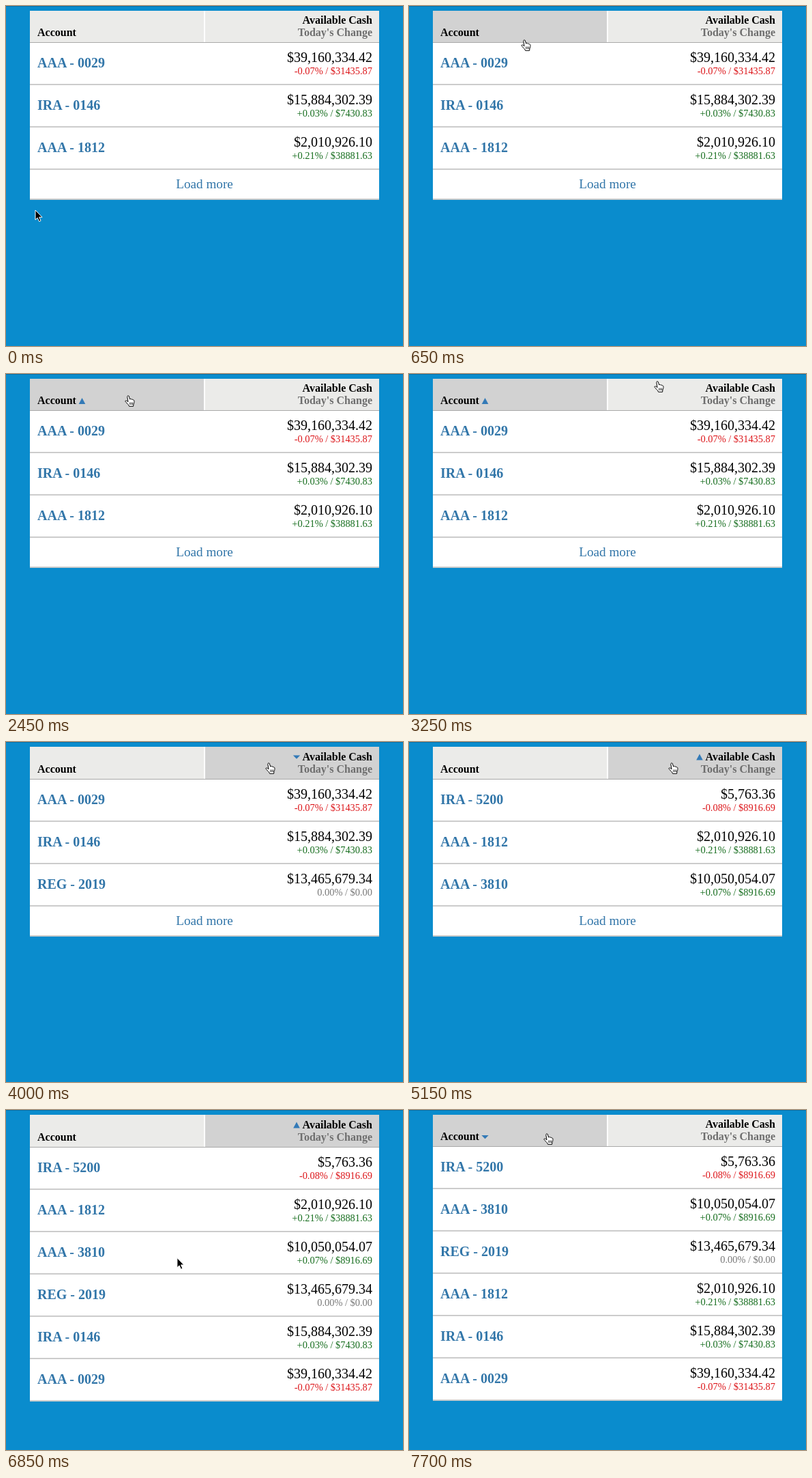
Animation of 582 by 498 pixels, one loop 8 s. Source, as an HTML page:

```html
<!DOCTYPE html>
<html lang="en">
<head>
<meta charset="utf-8">
<title>Sortable accounts</title>
<style>
  html, body { margin: 0; width: 100%; height: 100%; overflow: hidden; background: #0a8ccd; }
  svg { display: block; width: 582px; height: 498px; }
  text { font-family: "Liberation Serif", "Times New Roman", serif; }
  .head { font-size: 16px; font-weight: bold; }
  .sub { fill: #6e6e6e; }
  .end { text-anchor: end; }
  .name { font-size: 20px; font-weight: bold; fill: #3276a9; }
  .cash { font-size: 20px; }
  .change { font-size: 14.4px; }
  .up { fill: #146c1c; }
  .down { fill: #dc1418; }
  .flat { fill: #777; }
  .more { font-size: 19.2px; fill: #3276a9; text-anchor: middle; }
  .mark { fill: #337ab7; }
</style>
</head>
<body>
<svg viewBox="0 0 582 498">
  <rect width="582" height="498" fill="#0a8ccd"/>
  <rect width="582" height="1" fill="#0b6ea4"/>
  <rect id="panel" x="35" y="7" width="512" fill="#fff"/>
  <rect id="left" x="35" y="7" width="255"/>
  <rect id="right" x="292" y="7" width="255"/>
  <rect id="rule" x="35" width="512" height="1" fill="#a9a9a9"/>
  <g id="labels">
    <text class="head" x="46" y="44">Account</text>
    <text class="head end" x="537" y="26">Available Cash</text>
    <text class="head sub end" x="537" y="44">Today's Change</text>
    <path id="mark" class="mark"/>
  </g>
  <g id="body">
    <g id="rows"></g>
    <g id="load">
      <text class="more" id="more" x="291" y="267">Load more</text>
      <rect x="35" y="282" width="512" height="2" fill="#ccc"/>
    </g>
  </g>
  <g id="pointer">
    <path id="arrow" d="M0 0V14.2L3.2 11.2 5.6 16.6 8 15.6 5.7 10.3H10Z" fill="#000" stroke="#fff"/>
    <g id="hand" transform="translate(-5 0)" stroke="#000" stroke-linejoin="round">
      <path fill="#fff" d="M3.8 2.6C3.6 .6 5.9 .2 6.4 1.8L7.6 6C8.2 5.2 9.4 5.3 9.8 6.2 10.5 5.7 11.6 6 12 6.9 12.8 6.6 13.8 7.2 13.9 8.2 14.1 10 13.8 11.6 13 13L12.6 16.3H6.6C6 14.5 4.4 12.8 3 11.5 1.6 10.2 .8 9.2 1 8.6 1.4 7.6 2.8 7.8 3.6 8.6L5 9.8Z"/>
      <path fill="none" stroke-width=".8" d="M7.7 10.5V14M9.6 10.5V14M11.5 10.5V14"/>
    </g>
  </g>
</svg>
<script>
const LOOP = 8000, ROW = 62;
const LIGHT = '#ebebe9', DARK = '#d2d2d2';
const $ = id => document.getElementById(id);

// In ascending account order
const accounts = [
  ['AAA - 0029', '$39,160,334.42', '-0.07% / $31435.87'],
  ['IRA - 0146', '$15,884,302.39', '+0.03% / $7430.83'],
  ['AAA - 1812', '$2,010,926.10', '+0.21% / $38881.63'],
  ['REG - 2019', '$13,465,679.34', '0.00% / $0.00'],
  ['AAA - 3810', '$10,050,054.07', '+0.07% / $8916.69'],
  ['IRA - 5200', '$5,763.36', '-0.08% / $8916.69']
];
const amount = a => Number(a[1].replace(/[$,]/g, ''));
const byCash = [...accounts].sort((a, b) => amount(a) - amount(b));

// [time, value] steps; each value holds until the next
const sorts = [[0, ''], [1250, 'account down'], [2450, 'account up'],
  [3850, 'cash down'], [4700, 'cash up'], [7550, 'account down']];
const hovers = [[0, ''], [600, 'account'], [3000, ''], [3300, 'cash'],
  [5250, ''], [5750, 'more'], [6200, ''], [7150, 'account']];
const LOADED = 6200;

// Pointer hot spot: time, x, y
const path = [
  [50, 43, 299], [650, 169, 49], [850, 179, 31],
  [2950, 179, 31], [3250, 364, 10], [3700, 385, 30],
  [5150, 385, 30], [5600, 278, 286], [5850, 262, 258],
  [6700, 262, 258], [7250, 202, 34]
];

const at = (steps, t) => steps.filter(s => s[0] <= t).pop()[1];

function pointerAt(t) {
  const i = path.findIndex(p => p[0] > t);
  if (i === 0) return path[0].slice(1);
  if (i < 0) return path[path.length - 1].slice(1);
  const [a, b] = [path[i - 1], path[i]];
  const k = (t - a[0]) / (b[0] - a[0]), e = k * k * (3 - 2 * k);
  return [1, 2].map(n => a[n] + (b[n] - a[n]) * e);
}

function make(tag, attrs, parent) {
  const el = document.createElementNS('http://www.w3.org/2000/svg', tag);
  for (const k in attrs) el.setAttribute(k, attrs[k]);
  return parent.appendChild(el);
}

const rows = accounts.map((_, i) => {
  const g = make('g', { transform: `translate(0 ${54 + i * ROW})` }, $('rows'));
  make('rect', { x: 35, y: 60, width: 512, height: 2, fill: '#ccc' }, g);
  return {
    g,
    name: make('text', { class: 'name', x: 46, y: 36 }, g),
    cash: make('text', { class: 'cash end', x: 537, y: 28 }, g),
    change: make('text', { x: 537, y: 46 }, g)
  };
});

const show = (el, on) => el.setAttribute('visibility', on ? 'visible' : 'hidden');
const tone = s => s[0] === '+' ? 'up' : s[0] === '-' ? 'down' : 'flat';

function drawTable(sort, hover, loaded) {
  const [key, dir] = sort.split(' ');
  const list = [...(key === 'cash' ? byCash : accounts)];
  if (dir === 'down') list.reverse();
  const count = loaded ? 6 : 3;
  const drop = key === 'cash' ? 1 : 0;

  rows.forEach((r, i) => {
    const [name, cash, change] = list[i];
    show(r.g, i < count);
    r.name.textContent = name;
    r.cash.textContent = cash;
    r.change.textContent = change;
    r.change.setAttribute('class', 'change end ' + tone(change));
  });
  show($('load'), !loaded);
  $('more').style.fill = hover === 'more' ? '#23527c' : '';

  const bottom = loaded ? 426 : 284;
  $('panel').setAttribute('height', bottom + drop - 7);
  for (const [id, col] of [['left', 'account'], ['right', 'cash']]) {
    $(id).setAttribute('height', 46 + drop);
    $(id).setAttribute('fill', key === col || hover === col ? DARK : LIGHT);
  }
  $('rule').setAttribute('y', 53 + drop);
  for (const id of ['labels', 'body']) $(id).setAttribute('transform', `translate(0 ${drop})`);

  const [x, y] = key === 'cash' ? [426, 21] : [111.5, 39.5];
  const shape = dir === 'up' ? 'm-4.8 4.5h9.6l-4.8 -9z' : 'm-5.2 -2.5h10.4l-5.2 5.2z';
  $('mark').setAttribute('d', dir ? `M${x} ${y}${shape}` : '');
}

let last = '';
function frame(now) {
  const t = now % LOOP;
  const sort = at(sorts, t), hover = at(hovers, t), loaded = t >= LOADED;
  const state = [sort, hover, loaded].join();
  if (state !== last) drawTable(sort, hover, loaded);
  last = state;

  const [x, y] = pointerAt(t);
  const hand = hover !== '' || (t >= 3000 && t < 3300);
  $('pointer').setAttribute('transform', `translate(${x.toFixed(1)} ${y.toFixed(1)})`);
  show($('hand'), hand);
  show($('arrow'), !hand);
  requestAnimationFrame(frame);
}
frame(performance.now());
</script>
</body>
</html>
```
